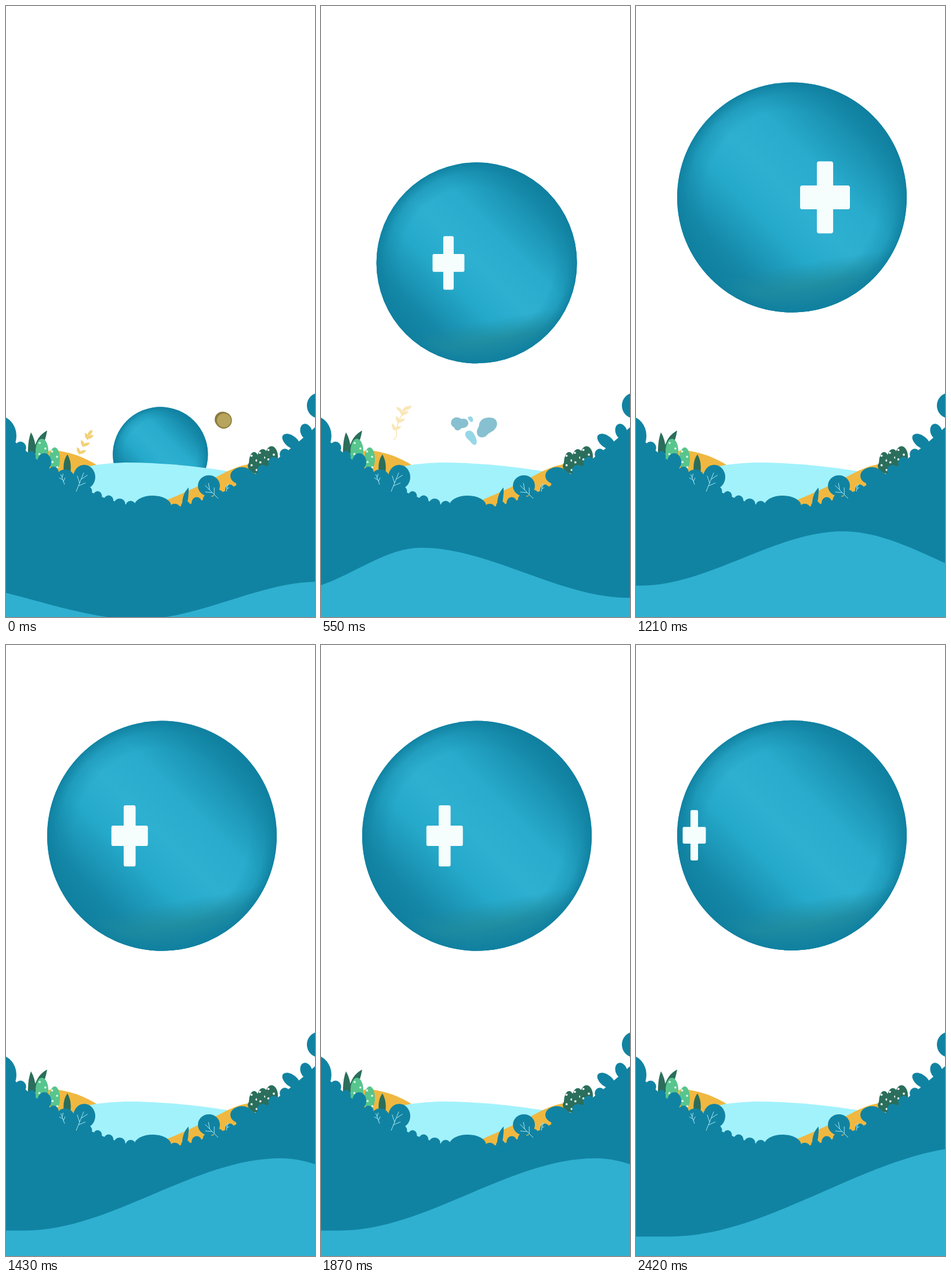
These frames come from a looping animation (533 by 1052 pixels, 2530 ms). An HTML page:

```html
<!DOCTYPE html>
<html lang="en">
<head>
<meta charset="utf-8">
<title>Rising ball</title>
<style>
  html, body { margin: 0; width: 100%; height: 100%; overflow: hidden; background: #fff; }
  svg { display: block; width: 100%; height: 100%; }
</style>
</head>
<body>
<svg viewBox="0 0 533 1052" preserveAspectRatio="none">
  <defs>
    <linearGradient id="band" gradientUnits="userSpaceOnUse" x1="-.7" y1=".7" x2=".7" y2="-.7">
      <stop offset="0" stop-color="#1080a0"/>
      <stop offset=".12" stop-color="#1588a8"/>
      <stop offset=".34" stop-color="#25a9ca"/>
      <stop offset=".5" stop-color="#2eb0d1"/>
      <stop offset=".68" stop-color="#28abcc"/>
      <stop offset=".92" stop-color="#168aaa"/>
      <stop offset="1" stop-color="#1080a0"/>
    </linearGradient>
    <radialGradient id="rim" gradientUnits="userSpaceOnUse" cx="0" cy="0" r="1">
      <stop offset=".76" stop-color="#1182a1" stop-opacity="0"/>
      <stop offset=".9" stop-color="#1182a1" stop-opacity=".35"/>
      <stop offset="1" stop-color="#1080a0" stop-opacity=".95"/>
    </radialGradient>
    <linearGradient id="shade" gradientUnits="userSpaceOnUse" x1="0" y1=".59" x2=".07" y2=".99">
      <stop offset="0" stop-color="#218d9f" stop-opacity="0"/>
      <stop offset=".5" stop-color="#218d9f" stop-opacity=".9"/>
      <stop offset="1" stop-color="#1482a0"/>
    </linearGradient>
  </defs>

  <g id="ball">
    <circle r="1" fill="url(#band)"/>
    <circle r="1" fill="url(#shade)"/>
    <circle r="1" fill="url(#rim)"/>
    <path id="cross" fill="#f5fdfd" stroke="#f5fdfd" stroke-width=".04" stroke-linejoin="round"
      d="M-.051-.293H.051V-.084H.197V.084H.051V.293H-.051V.084H-.197V-.084H-.051Z"/>
  </g>

  <g id="blobs" fill="#1183a2">
    <path d="M225 714C230 706 237 708 242 711C249 709 255 713 254 720C251 727 246 726 242 727C238 732 231 732 230 726Q222 722 225 714Z"/>
    <path d="M273 719C276 710 286 707 295 709C304 711 306 720 301 727C296 734 291 733 286 739C281 745 270 744 269 735C268 729 273 726 273 719Z"/>
    <path fill="#2fb0d0" d="M253 709C256 705 261 706 262 711C263 718 258 719 253 709ZM249 735C253 729 260 730 264 737C274 753 266 763 257 749Q247 742 249 735Z"/>
  </g>

  <g id="coin">
    <circle cx="373.5" cy="712" r="13.5" fill="#89763d"/>
    <circle cx="375.5" cy="713.5" r="14.2" fill="#8f7c3f"/>
    <circle cx="376" cy="713.5" r="12" fill="#b7a45d"/>
  </g>

  <g id="sprig" fill="#f3d175"></g>

  <path fill="#f0b840" d="M40 800Q58 765 82 765Q122 768 161 793V850H40Z"/>
  <path fill="#a2f2fc" d="M120 798Q158 787 205 786Q292 786 383 801L345 872H125Z"/>
  <path fill="#f0b840" d="M272 853Q328 830 382 801Q408 789 430 787V872H285Z"/>

  <path fill="#2b6e5c" d="M38 775Q37 750 43 734Q52 748 52 775ZM47 775Q49 742 71 731Q67 755 54 775ZM100 804Q97 784 106 772Q114 786 111 804Z"/>
  <g id="greens"></g>
  <g id="land" fill="#1183a2">
    <ellipse cx="-12" cy="740" rx="30" ry="34"/>
    <ellipse cx="66" cy="785" rx="12" ry="15"/>
    <ellipse cx="102" cy="813" rx="16" ry="15"/>
    <ellipse cx="135" cy="811" rx="19" ry="21"/>
    <ellipse cx="253" cy="861" rx="32" ry="18"/>
    <ellipse cx="350" cy="826" rx="19" ry="18"/>
    <ellipse cx="407" cy="809" rx="20" ry="15"/>
    <ellipse cx="492" cy="750" rx="18" ry="10" transform="rotate(38 492 750)"/>
    <ellipse cx="518" cy="733" rx="10" ry="14" transform="rotate(-20 518 733)"/>
    <ellipse cx="540" cy="688" rx="21" ry="22"/>
    <path d="M304 868Q302 841 315 829Q316 845 310 867Z"/>
  </g>
  <path id="veins" fill="none" stroke="#a9e6f2"/>
  <path id="wave" fill="#2fb0d0"/>
</svg>
<script>
const STEP = 110, STEPS = 23, LIFT = 41;
const el = id => document.getElementById(id);
const set = (id, name, value) => el(id).setAttribute(name, value);
const add = (id, markup) => el(id).insertAdjacentHTML('beforeend', markup);

let seed = 7;
const random = () => (seed = seed * 16807 % 2147483647) / 2147483647;

const ellipse = (x, y, rx, ry, color) =>
  `<ellipse cx="${x}" cy="${y}" rx="${rx}" ry="${ry}" fill="${color}"/>`;

function speckled(x, y, rx, ry, color, dot) {
  let out = ellipse(x, y, rx, ry, color);
  for (let i = 0; i < 4; i++) {
    const dx = (i % 2 - .5) * rx * (.7 + .4 * random());
    out += ellipse(x + dx, y + (i / 2.2 - .65) * ry, 1.9, 1.9, dot);
  }
  return out;
}

function drawGreens() {
  add('greens', speckled(62, 766, 11, 21, '#57c58d', '#d9f7e6') +
    speckled(84, 780, 9, 20, '#57c58d', '#d9f7e6') +
    ellipse(50, 782, 8, 12, '#57c58d') + ellipse(441, 792, 24, 14, '#2b6e5c'));
  for (let i = 0; i < 3; i++)
    add('greens', speckled(428 + 15 * i, 786 - 5 * i, 9 + i, 18, '#2b6e5c', '#e9f6f1'));
}

// The land is a valley with small bushes along its ridge.
const ridge = x => 866 - .0058 * Math.abs(x - 260) ** 1.8;

function drawLand() {
  let d = 'M0 1052';
  for (let x = 0; x <= 540; x += 10) d += `L${x} ${ridge(x)}`;
  add('land', `<path d="${d}V1052Z"/>`);
  for (let x = 25; x < 500; x += 19)
    add('land', ellipse(x, ridge(x) + 2, 7 + 3 * random(), 8 + 3 * random(), '#1183a2'));
}

function vein(x, y, length, angle) {
  const at = (px, py, len, deg) => {
    const a = deg * Math.PI / 180;
    return [px + len * Math.cos(a), py + len * Math.sin(a)];
  };
  let d = `M${x} ${y}L${at(x, y, length, angle)}`;
  for (const [part, turn] of [[.3, 45], [.45, -40], [.65, 35]]) {
    const p = at(x, y, length * part, angle);
    d += `M${p}L${at(...p, length * .38, angle + turn)}`;
  }
  return d;
}

function drawSprig() {
  const leaf = (x, y, turn) =>
    `<path transform="translate(${x} ${y}) rotate(${turn})" d="M-7 0Q0-6 7 0Q0 5-7 0Z"/>`;
  for (let i = 0; i < 3; i++)
    add('sprig', leaf(125 + 7 * i, 766 - 12.5 * i, 70) + leaf(132 + 6.5 * i, 768 - 13 * i, -25));
  add('sprig', leaf(145, 735, -50) + `<g id="loose">${leaf(135, 736, 40)}${leaf(151, 733, -35)}` +
    '<path fill="none" stroke="#f3d175" stroke-width="1.6" d="M125 788Q132 783 130 773Q131 758 142 740"/></g>');
}

// Each wave lists its left trough, crest and right trough.
const front = { cx: .288, sx: 1, sy: 1 }, side = { cx: -.851, sx: .465, sy: .7 };
const bare = { mark: 1, blobs: 0, coin: 0, sprig: 0, lift: LIFT };
const start = { ...bare, ...front, mark: 0, coin: 1, sprig: 1, lift: 0, x: 266.3, y: 772.3, r: 82,
  wave: [[-400, 1040], [-130, 991], [229, 1056]] };
const rise = { ...bare, ...front, blobs: 1, sprig: 1, x: 268.2, y: 547.7, r: 148,
  wave: [[-110, 1020], [92, 950], [383, 1008]] };
const low = { ...bare, ...side, x: 269, y: 337, r: 198,
  wave: [[18, 991], [252, 915.5], [680, 1030]] };
const mid = { ...low, ...front, y: 329.5, wave: [[8, 998], [357, 904.5], [700, 1010]] };
const high = { ...low, y: 327.7, wave: [[58, 1018.5], [590, 863], [900, 990]] };
const keys = [[0, start], [3, rise], [7, low], [11, mid], [15, high], [19, mid], [22, high]];

const mix = (a, b, p) => Array.isArray(a) ? a.map((v, i) => mix(v, b[i], p)) : a + (b - a) * p;

function poseAt(step) {
  const i = Math.max(1, keys.findIndex(([at]) => at >= step));
  const [t0, a] = keys[i - 1], [t1, b] = keys[i];
  const p = (1 - Math.cos(Math.PI * (step - t0) / (t1 - t0))) / 2;
  return Object.fromEntries(Object.keys(a).map(k => [k, mix(a[k], b[k], p)]));
}

function wavePath([trough, crest, dip]) {
  let [x, y] = trough, d = `M-500 1060V${y}H${x}`;
  for (const [nx, ny] of [crest, dip, [dip[0] + 312, crest[1]]]) {
    const third = (nx - x) / 3;
    d += `C${x + third} ${y} ${nx - third} ${ny} ${nx} ${ny}`;
    [x, y] = [nx, ny];
  }
  return d + 'V1060Z';
}

function draw(time) {
  const s = poseAt(Math.floor(time / STEP) % STEPS);
  set('ball', 'transform', `translate(${s.x} ${s.y}) scale(${s.r})`);
  set('cross', 'transform', `translate(${s.cx} 0) scale(${s.sx} ${s.sy})`);
  set('cross', 'opacity', s.mark);
  for (const id of ['blobs', 'coin', 'sprig']) set(id, 'opacity', s[id]);
  set('sprig', 'transform', `translate(0 ${-s.lift})`);
  set('loose', 'opacity', s.lift / LIFT);
  set('wave', 'd', wavePath(s.wave));
}

drawGreens();
drawLand();
drawSprig();
set('veins', 'd', vein(121, 836, 35, -68) + vein(101, 824, 19, -110) +
  vein(366, 848, 32, -135) + vein(380, 836, 14, -80));

const begin = performance.now();
function tick() {
  draw(performance.now() - begin);
  requestAnimationFrame(tick);
}
tick();
</script>
</body>
</html>
```
